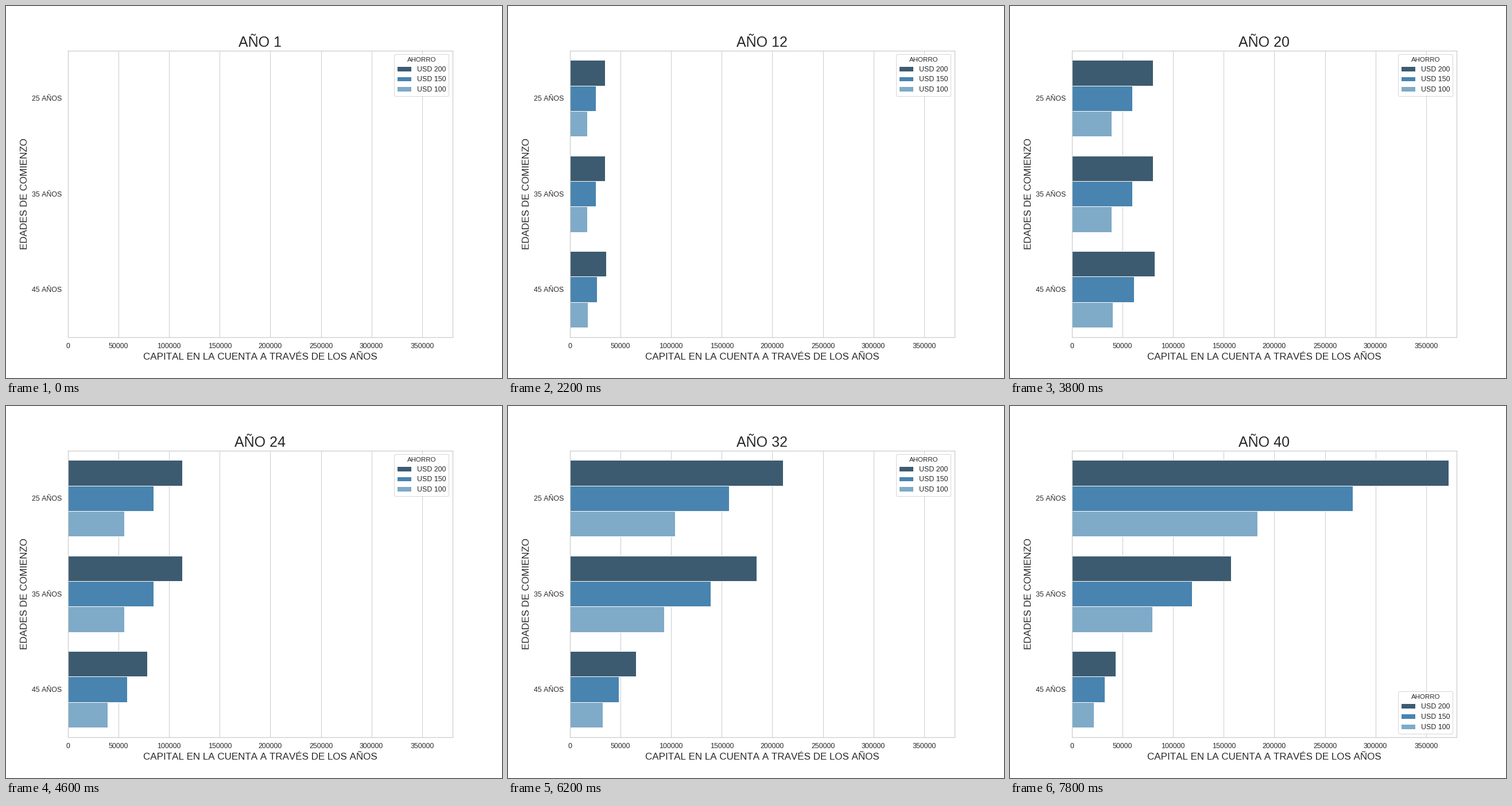
These frames come from a looping animation (864 px wide and 648 px high, 8 s). A matplotlib script:

```python
import matplotlib.pyplot as plt
from matplotlib.animation import FuncAnimation
from matplotlib.patches import Patch
import numpy as np

plt.rcParams.update({
    "font.family": "Liberation Sans",
    "text.kerning_factor": 6,
    "text.color": "0.15",
    "axes.labelcolor": "0.15",
    "xtick.labelcolor": "0.15",
    "ytick.labelcolor": "0.15",
    "axes.edgecolor": "0.8",
    "axes.linewidth": 1.25,
    "axes.axisbelow": True,
    "grid.color": "0.8",
    "grid.linewidth": 1,
})

YEARS = 40
RATE = 0.0654
FEE = 0.009
SMALL = 12.4
COLORS = ["#3d5b70", "#4884af", "#7faac8"]
SAVINGS = ["USD 200", "USD 150", "USD 100"]
AGES = ["25 AÑOS", "35 AÑOS", "45 AÑOS"]
BAR = 0.8 / 3

# Capital factor of each saving plan while paying in
GROWTH = np.array([34400, 25660, 16950])

# Per age: starting capital, retirement year, ceiling and depletion
# of the withdrawal curve, and relative size of each plan
PLANS = [
    (0, 40, 0, 0, (1, 1, 1)),
    (0, 30, 226700, 37000, (1, 0.754, 0.505)),
    (620, 20, 98300, 15500, (1, 0.743, 0.498)),
]


def capital(year, start, retire, ceiling, depletion, scale):
    """Capital of the three saving plans in a given year."""
    factor = (1 + RATE) ** (year - 1)
    saved = GROWTH * (factor - 1 - FEE + start * factor / GROWTH[0])
    if year <= retire:
        return saved
    left = ceiling - depletion * (1 + RATE) ** (year - retire)
    return np.minimum(saved, left * np.array(scale))


fig, ax = plt.subplots(figsize=(12, 9), dpi=72)
fig.subplots_adjust(left=0.125, right=0.9, bottom=0.11, top=0.88)

rows = []
for age in range(3):
    ys = age + (np.arange(3) - 1) * BAR
    rows.append(ax.barh(ys, np.zeros(3), height=BAR, color=COLORS,
                        edgecolor="white", linewidth=1))

ax.set_xlim(0, 380000)
ax.set_ylim(2.5, -0.5)
ax.set_xticks(range(0, 350001, 50000))
ax.set_yticks(range(3), AGES)
ax.tick_params(length=0, pad=10.5, labelsize=SMALL)
ax.xaxis.grid(True)
ax.set_xlabel("CAPITAL EN LA CUENTA A TRAVÉS DE LOS AÑOS",
              fontsize=17, labelpad=5)
ax.set_ylabel("EDADES DE COMIENZO", fontsize=17, labelpad=5)
title = ax.set_title("AÑO 1", fontsize=25, pad=7)

handles = [Patch(facecolor=c, edgecolor="white", linewidth=1, label=s)
           for c, s in zip(COLORS, SAVINGS)]
legend = ax.legend(handles=handles, title="AHORRO", loc="upper right",
                   fontsize=SMALL, title_fontsize=11.45, labelspacing=0.46)


def update(i):
    year = i + 1
    title.set_text(f"AÑO {year}")
    for bars, plan in zip(rows, PLANS):
        for bar, value in zip(bars, capital(year, *plan)):
            bar.set_width(value)
    # The legend steps aside once the longest bar reaches it
    legend.set_loc("lower right" if year >= 38 else "upper right")
    return [title, legend]


anim = FuncAnimation(fig, update, frames=YEARS, interval=200,
                     repeat=True, repeat_delay=0, blit=False)
plt.show()
```
